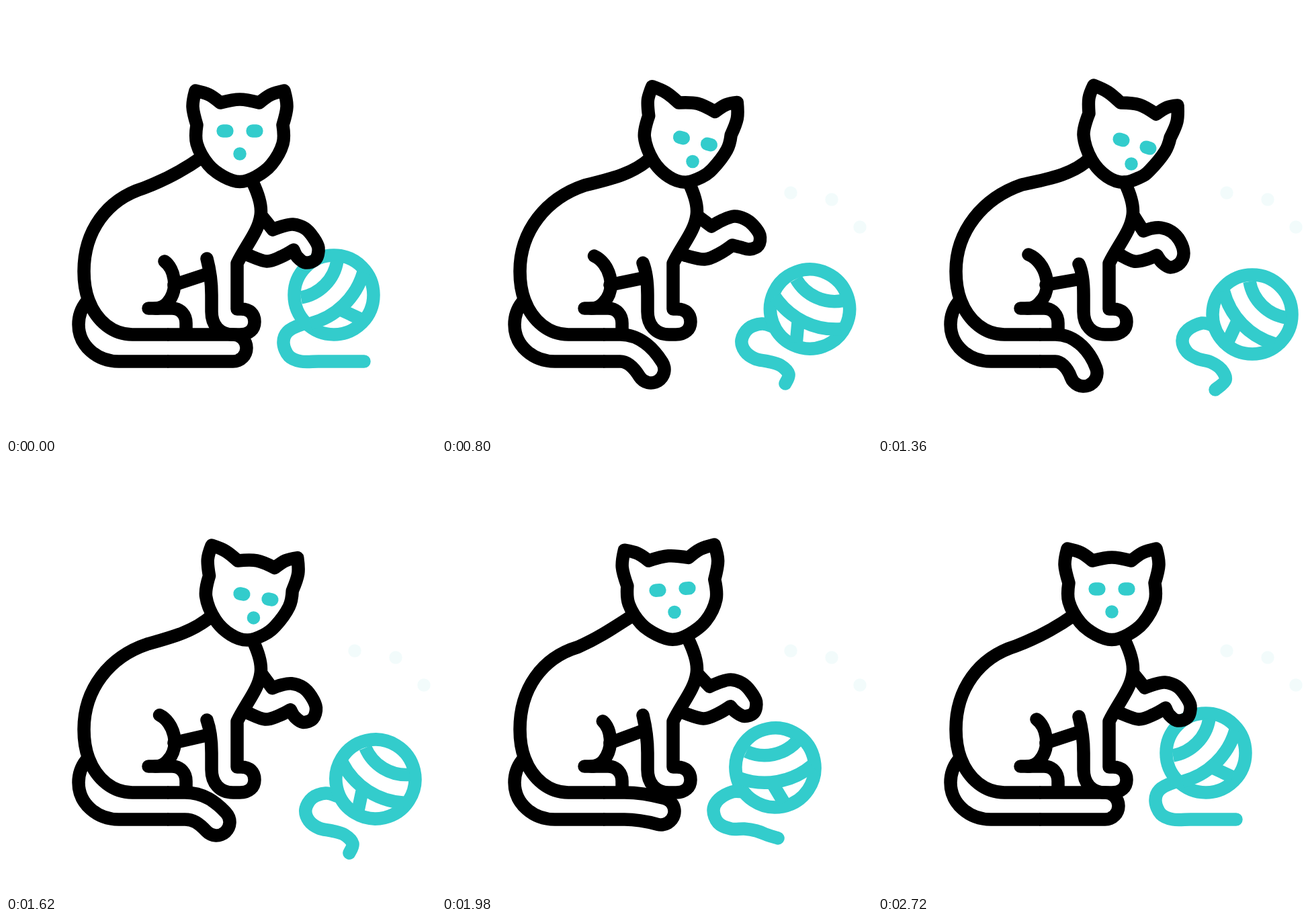
Recreate the animation shown at these times as an HTML page. Size 640 px wide and 640 px high, loop 3600 ms.

```html
<!DOCTYPE html>
<html lang="en">
<head>
<meta charset="utf-8">
<title>Cat with a ball of yarn</title>
<style>
  html, body { margin: 0; width: 100%; height: 100%; overflow: hidden; background: #fff; }
  svg { display: block; width: 100%; height: 100%; }
  path, line, circle { fill: none; stroke-width: 19.5; stroke-linecap: round; stroke-linejoin: round; }
  .cat { stroke: #000; }
  .teal { stroke: #33cccc; }
  .wrap { stroke-linecap: butt; }
  #nose { fill: #33cccc; stroke: none; }
  #tail { stroke-width: 59.5; }
  #tailFill { stroke: #fff; stroke-width: 20.5; }
</style>
</head>
<body>
<svg viewBox="0 0 640 640">
  <g class="teal">
    <path id="string"/>
    <g id="ball">
      <circle r="59"/>
      <path class="wrap" d="M-49 4A66 66 0 0 0 5 -51M-34.8 42.6A110 110 0 0 0 43.8 -33.3M10 22L40 36"/>
    </g>
    <g id="rays"><line/><line/><line/></g>
  </g>
  <g class="cat">
    <path id="tail"/>
    <path id="tailFill"/>
    <path d="M120 440C112 450 108 462 108 474C108 506 136 529 168 529H240"/>
    <path id="back"/>
    <path id="thigh"/>
    <path d="M212 450H247C260 450 268 460 268 472V487"/>
    <path id="belly"/>
    <path id="leg"/>
    <path id="arm"/>
    <path id="head"/>
  </g>
  <g class="teal">
    <line id="eyeL"/><line id="eyeR"/>
    <circle id="nose" r="9.75"/>
  </g>
</svg>
<script>
const LOOP = 3600;
const KEYS = [180, 460, 800, 1360, 1620, 1980];
const $ = id => document.getElementById(id);
const nums = s => s.trim().split(/\s+/).map(Number);
const draw = (id, d) => $(id).setAttribute('d', d);
const set = (el, attrs) => { for (const k in attrs) el.setAttribute(k, attrs[k]); };
const mix = (a, b, k) => a.map((v, i) => v + (b[i] - v) * k);

// Smooth track through timed rows, without overshoot between keys
function track(times, rows) {
  const last = times.length - 1;
  const slope = (i, c) => (rows[i + 1][c] - rows[i][c]) / (times[i + 1] - times[i]);
  const tangent = (i, c) => {
    if (i === 0 || i === last) return 0;
    const a = slope(i - 1, c), b = slope(i, c);
    return a * b <= 0 ? 0 : 2 * a * b / (a + b);
  };
  return t => {
    if (t <= times[0]) return rows[0];
    if (t >= times[last]) return rows[last];
    let i = 0;
    while (t >= times[i + 1]) i++;
    const h = times[i + 1] - times[i], u = (t - times[i]) / h, v = 1 - u;
    return rows[i].map((p, c) =>
      p * (1 + 2 * u) * v * v + rows[i + 1][c] * u * u * (3 - 2 * u) +
      h * (tangent(i, c) * u * v * v - tangent(i + 1, c) * u * u * v));
  };
}

// Poses at the shared keys, back to the first one at the end
const poses = (rows, end = 2720) => track([...KEYS, end], [...rows, rows[0]]);

// Curve through points; listed indices are sharp corners
function curve(p, corners = []) {
  const n = p.length / 2;
  const pt = i => { i = Math.max(0, Math.min(n - 1, i)); return [p[2 * i], p[2 * i + 1]]; };
  const handle = (i, sign) => {
    const [x, y] = pt(i);
    if (corners.includes(i)) return [x, y];
    const a = pt(i - 1), b = pt(i + 1);
    return [x + sign * (b[0] - a[0]) / 6, y + sign * (b[1] - a[1]) / 6];
  };
  let d = 'M' + pt(0);
  for (let i = 0; i < n - 1; i++) d += 'C' + [handle(i, 1), handle(i + 1, -1), pt(i + 1)].join(' ');
  return d;
}

const armRest = nums('397 333 411 328 427 325 445 331 457 344 465 360 461 377 446 382 434 374 428 363 410 373 388 380');
const armHigh = nums('403 325 417 313 430 300 446 295 464 296 480 304 483 320 472 336 455 338 446 338 427 362 400 374');
const armMid = nums('401 328 417 319 435 313 451 317 463 326 473 341 471 356 458 362 444 359 432 356 414 368 391 377');
const armLow = nums('395 335 407 331 421 330 437 336 449 349 455 368 449 383 435 389 423 382 415 371 400 377 381 380');
const arm = poses([armRest, armHigh, armMid, armLow,
  mix(armRest, armLow, .35), mix(armRest, armMid, .33)]);

const stringRest = nums('455 473 440 474 419 485 413 502 421 521 439 529 465 529 490 529 512 529 533 529');
const stringOut = nums('492 477 476 473 456 480 446 497 451 514 466 525 485 529 504 535 516 548 511 562');
const stringFar = nums('500 476 482 472 461 482 453 498 460 515 476 525 495 530 511 541 517 557 502 571');
const stringBack = nums('447 488 432 488 412 499 404 515 411 534 430 543 450 543 468 546 484 552 500 557');
const string = poses([stringRest, mix(stringRest, stringOut, .34), stringOut, stringFar,
  stringOut.map((v, i) => v + i % 2 * 17), stringBack], 2400);

// Tip and its angle in degrees
const tail = poses([[338, 509, 0], [319, 529, 42], [311, 541, 58], [306, 546, 70],
  [313, 533, 47], [326, 517, 15]], 2500);

// Left eye, right eye, nose
const face = poses([
  [326, 186, 370, 186, 348, 220],
  [351, 194.5, 392.5, 202, 369, 229],
  [356.5, 196, 397.5, 206, 373, 231.5],
  [362, 199, 402, 211, 377, 235],
  [351, 193.5, 393, 201.5, 368.5, 229],
  [321, 188, 365, 185, 346, 220.5]]);

// Centre and turn of the ball
const ball = track([...KEYS.slice(0, 4), 1480, 1620, 1780, 1980, 2320, 2720], [
  [488, 430, 0], [507.5, 434, 18], [547.5, 451, 70], [557, 459, 90], [560, 465, 88],
  [550, 469, 77], [528, 466, 58], [496, 452, 34], [489, 432, 4], [488, 430, 0]]);

const lean = track([180, 460, 800, 1280, 1360, 1620, 1980, 2130, 2320, 2720],
  [0, .55, .79, 1, 1, .62, -.27, -.38, -.28, 0].map(v => [v]));

const headUp = nums(`284 177 278 150 282 126 302 132 319 144 348 139 377 144 394 132 414 126
  418 150 412 177 412 205 395 236 372 254 348 261.5 324 254 301 236 284 205 284 177`);
const headTilt = nums(`314 160 314 137 321 118 342 128 361 144 389 147 414 161 430 151 446 148
  445 172 435 196 427 217 404 245 390 255 366 262.5 341 254 318 229 306 192 314 160`);

// Each ray runs from its inner to its outer end
const rays = [[518, 345, 519, 278], [541, 358, 580, 288], [564, 371, 622, 329]];
const rayTip = track([260, 460, 580], [[0], [.8], [1]]);
const rayTail = track([320, 460, 700], [[0], [.31], [1]]);
const rayFade = track([600, 700], [[1], [.06]]);

function drawRays(t) {
  const a = rayTail(t)[0], b = rayTip(t)[0];
  $('rays').setAttribute('opacity', t < 260 ? 0 : rayFade(t)[0]);
  rays.forEach(([x, y, X, Y], i) => set($('rays').children[i], {
    x1: x + (X - x) * a, y1: y + (Y - y) * a,
    x2: x + (X - x) * b + .01, y2: y + (Y - y) * b
  }));
}

function drawFace(t) {
  const [lx, ly, rx, ry, nx, ny] = face(t);
  const turn = Math.atan2(ry - ly, rx - lx);
  const dx = 2.9 * Math.cos(turn), dy = 2.9 * Math.sin(turn);
  const eye = (id, x, y) => set($(id), { x1: x - dx, y1: y - dy, x2: x + dx, y2: y + dy });
  eye('eyeL', lx, ly);
  eye('eyeR', rx, ry);
  set($('nose'), { cx: nx, cy: ny });
}

function drawTail(t, k) {
  const [x, y, angle] = tail(t), a = angle * Math.PI / 180, bend = 270 - 6 * k;
  const d = `M240 509H${bend}C${bend + 20} 509 ${x - 20 * Math.cos(a)} ${y - 20 * Math.sin(a)} ${x} ${y}`;
  // Butt start on the left is hidden by starting the caps inside the body
  draw('tail', d);
  draw('tailFill', d);
}

function drawBody(k) {
  draw('back', `M${290 + 26 * k} 226C${262 + 28 * k} ${246 + 6 * k} ${236 + 14 * k} ${259 - k}
    ${205 + 9 * k} ${271 - 5 * k}C${150 + 6 * k} ${288 - 2 * k} 116 335 116 395
    C116 410 118 425 123 438C135 470 160 489 188 489H240`);
  draw('thigh', `M${236 - 12 * k} ${380 - 10 * k}C${250 - k} ${390 - 10 * k} ${258 + 4 * k} 420 241 441Q234 450 222 450`);
  draw('belly', `M250 415L302 ${398 + 8 * k}`);
  draw('leg', `M299 ${376 + 8 * k}C304 395 306 410 306 430V455C306 475 318 489 338 489H348
    C362 489 370 481 370 470C370 458 362 451 350 451H344V383
    C358 355 376 335 379 312C381 300 378 285 367 262`);
  draw('head', curve(mix(headUp, headTilt, k), [0, 2, 4, 6, 8, 10, 18]) + 'Z');
}

function render(t) {
  const [x, y, turn] = ball(t), k = lean(t)[0];
  $('ball').setAttribute('transform', `translate(${x} ${y}) rotate(${turn})`);
  draw('string', curve(string(t)));
  draw('arm', curve([381, 313, ...arm(t), 361, 371], [1, 10]));
  drawTail(t, k);
  drawBody(k);
  drawFace(t);
  drawRays(t);
}

// The tail's left end must be open: square off its start with a clip
document.querySelector('svg').insertAdjacentHTML('afterbegin',
  '<clipPath id="open"><path d="M240 400H640V640H240Z"/></clipPath>');
for (const id of ['tail', 'tailFill']) $(id).setAttribute('clip-path', 'url(#open)');

const start = performance.now();
function tick() {
  render((performance.now() - start) % LOOP);
  requestAnimationFrame(tick);
}
tick();
</script>
</body>
</html>
```
